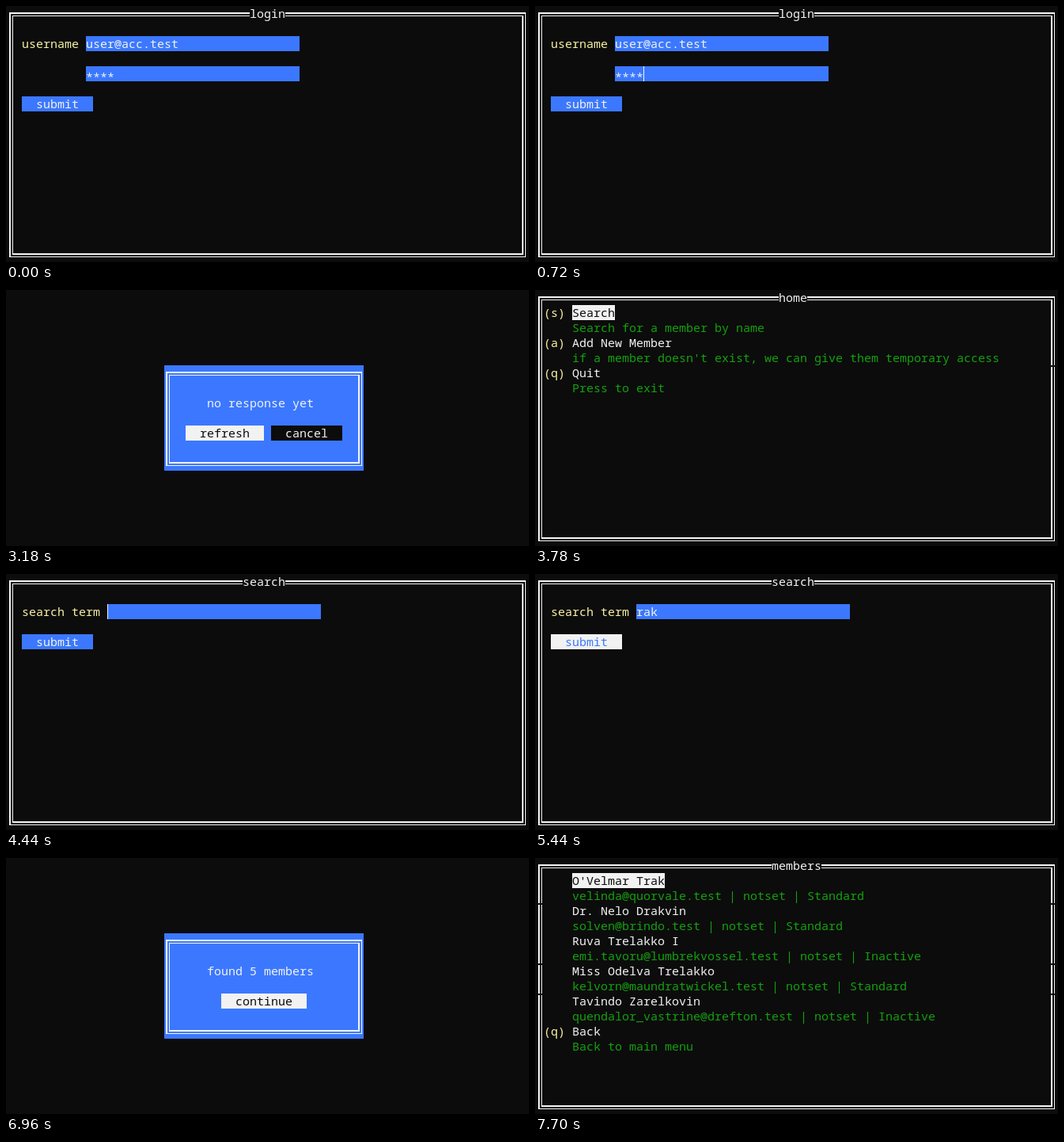
Recreate the animation shown at these times as an HTML page. Size 661 px wide and 323 px high, loop 8 s.

```html
<!DOCTYPE html>
<html lang="en">
<head>
<meta charset="utf-8">
<title>Member console</title>
<style>
  html, body { margin: 0; width: 100%; height: 100%; overflow: hidden; background: #0c0c0c; }
  svg { display: block; }
  text { font: 500 15px "Noto Sans Mono", "DejaVu Sans Mono", monospace; white-space: pre; }
</style>
</head>
<body>
<svg id="stage" width="661" height="323" viewBox="0 0 661 323"></svg>
<script>
const LOOP = 8000;
const CELL = 9, LINE = 19, LEFT = 2;
const BLACK = '#0c0c0c', BLUE = '#3b78ff', WHITE = '#f2f2f2', YELLOW = '#f9f1a5', GREEN = '#13a10e';
const stage = document.getElementById('stage');

const colX = col => LEFT + col * CELL;
const rect = (x, y, w, h, fill) =>
  `<rect x="${x}" y="${y}" width="${w}" height="${h}" fill="${fill}"/>`;
const cells = (col, row, cols, rows, fill) =>
  rect(colX(col), row * LINE, cols * CELL, rows * LINE, fill);
const label = (col, row, str, fill = WHITE, dy = 0) =>
  `<text x="${colX(col)}" y="${row * LINE + 15 + dy}" fill="${fill}">${str}</text>`;
const caret = (col, row) => rect(colX(col), row * LINE, 1, LINE, WHITE);

// Double-line box; each stroke pair is a 2px line followed by a 1px line.
function frame(col, row, cols, rows) {
  const x1 = colX(col), x2 = colX(col + cols - 1);
  const y1 = row * LINE, y2 = (row + rows - 1) * LINE;
  const ring = (l, t, r, b, lw, tw, rw, bw) =>
    rect(l, t, r - l, tw, WHITE) + rect(l, b - bw, r - l, bw, WHITE) +
    rect(l, t, lw, b - t, WHITE) + rect(r - rw, t, rw, b - t, WHITE);
  return ring(x1 + 2, y1 + 8, x2 + 7, y2 + 13, 2, 2, 1, 1) +
         ring(x1 + 6, y1 + 12, x2 + 4, y2 + 10, 1, 1, 2, 2);
}

function page(title, body) {
  const col = Math.floor((73 - title.length) / 2);
  return frame(0, 0, 73, 17) + cells(col, 0, title.length, 1, BLACK) + label(col, 0, title) + body;
}

const button = (col, row, str, fill, ink) =>
  cells(col, row, str.length + 4, 1, fill) + label(col + 2, row, str, ink);
const submit = (row, focused) =>
  button(2, row, 'submit', focused ? WHITE : BLUE, focused ? BLUE : WHITE);

function login(focused, blink) {
  return page('login',
    label(2, 2, 'username', YELLOW) + cells(11, 2, 30, 1, BLUE) + label(11, 2, 'user@acc.test') +
    cells(11, 4, 30, 1, BLUE) + label(11, 4, '****', WHITE, 4) +
    submit(6, focused) + (blink ? caret(15, 4) : ''));
}

function search(term, focused) {
  return page('search',
    label(2, 2, 'search term', YELLOW) + cells(14, 2, 30, 1, BLUE) + label(14, 2, term) +
    submit(4, focused) + (focused ? '' : caret(14 + term.length, 2)));
}

const dialog = (message, buttons) =>
  cells(22, 5, 28, 7, BLUE) + frame(22, 5, 28, 7) + label(28, 7, message) + buttons;

const waiting = () => dialog('no response yet',
  button(25, 9, 'refresh', WHITE, BLACK) + button(37, 9, 'cancel', BLACK, WHITE));
const found = () => dialog('found 5 members', button(30, 9, 'continue', WHITE, BLACK));

const list = items => items.map(([key, main, note], i) => {
  const row = 1 + i * 2, selected = i === 0;
  return (key ? label(1, row, `(${key})`, YELLOW) : '') +
    (selected ? cells(5, row, main.length, 1, WHITE) : '') +
    label(5, row, main, selected ? BLACK : WHITE) + label(5, row + 1, note, GREEN);
}).join('');

// Hairline breaks in the border between text rows.
const gap = (col, row) => rect(colX(col), row * LINE, CELL, 2, BLACK);

const home = () => page('home', list([
  ['s', 'Search', 'Search for a member by name'],
  ['a', 'Add New Member', "if a member doesn't exist, we can give them temporary access"],
  ['q', 'Quit', 'Press to exit']
]) + gap(72, 5));

const members = () => page('members', list([
  ['', "O'Velmar Trak", 'velinda@quorvale.test | notset | Standard'],
  ['', 'Dr. Nelo Drakvin', 'solven@brindo.test | notset | Standard'],
  ['', 'Ruva Trelakko I', 'emi.tavoru@lumbrekvossel.test | notset | Inactive'],
  ['', 'Miss Odelva Trelakko', 'kelvorn@maundratwickel.test | notset | Standard'],
  ['', 'Tavindo Zarelkovin', 'quendalor_vastrine@drefton.test | notset | Inactive'],
  ['q', 'Back', 'Back to main menu']
]) + [3, 7, 9].map(row => gap(0, row) + gap(72, row)).join(''));

const timeline = [
  [0, () => login(false, false)],
  [460, () => login(false, true)],
  [930, () => login(false, false)],
  [1450, () => login(false, true)],
  [1780, () => login(true, false)],
  [3180, waiting],
  [3780, home],
  [4440, () => search('', false)],
  [5110, () => search('r', false)],
  [5200, () => search('ra', false)],
  [5300, () => search('rak', false)],
  [5440, () => search('rak', true)],
  [5900, waiting],
  [6960, found],
  [7700, members]
];

let shown = null;
function render(time) {
  const scene = timeline.findLast(([start]) => time >= start);
  if (scene === shown) return;
  shown = scene;
  stage.innerHTML = rect(0, 0, 661, 323, BLACK) + scene[1]();
}

const origin = performance.now();
function tick() {
  render((performance.now() - origin) % LOOP);
  requestAnimationFrame(tick);
}
tick();
</script>
</body>
</html>
```
